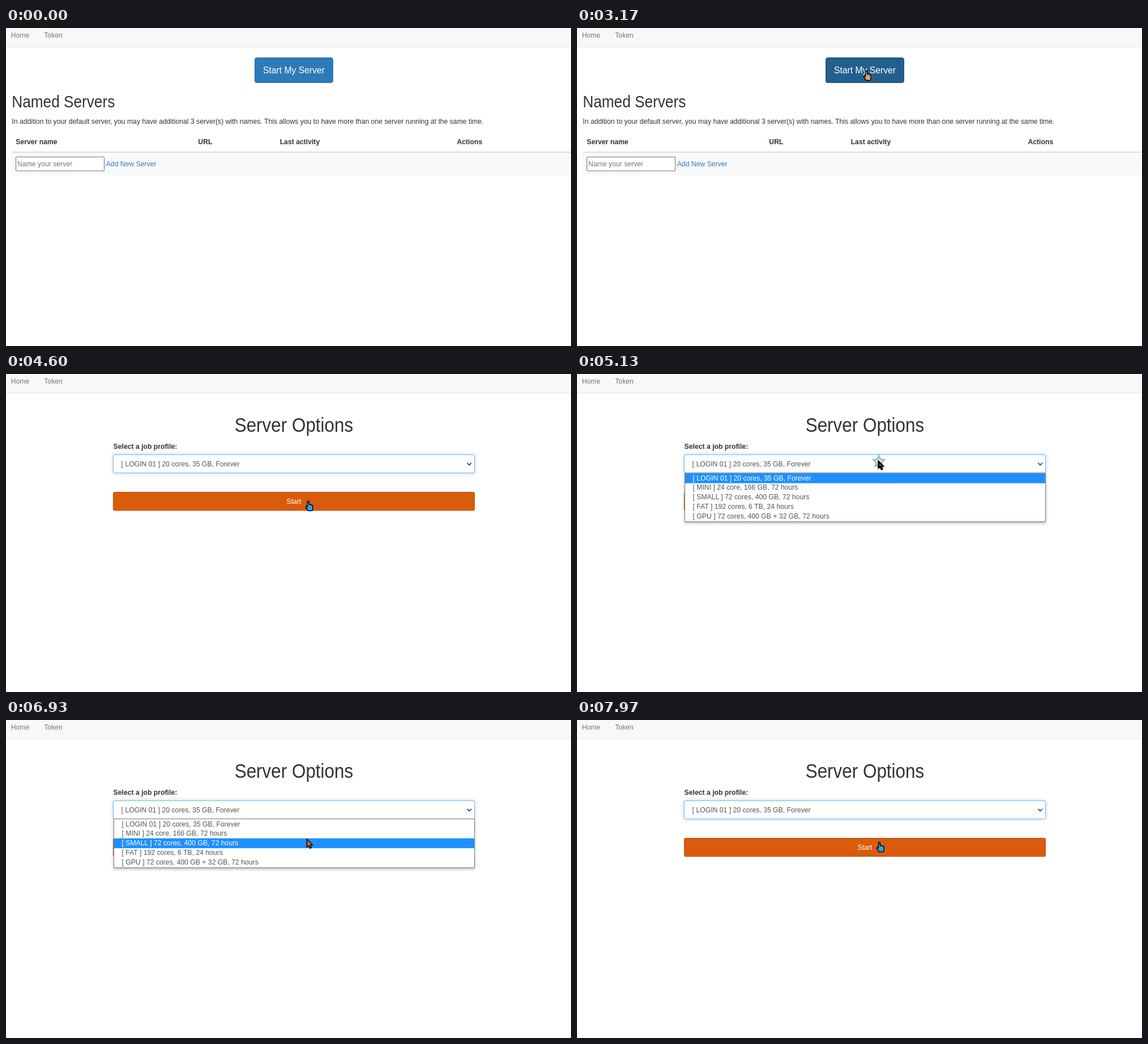
These frames come from a looping animation (998x561 px, 8 s). An HTML page:

```html
<!DOCTYPE html>
<html lang="en">
<head>
<meta charset="utf-8">
<title>Server start</title>
<style>
  html, body { margin: 0; width: 100%; height: 100%; overflow: hidden; background: #fff; }
  svg { display: block; width: 998px; height: 561px; }
  text { font: 14px "Liberation Sans", Arial, sans-serif; fill: #333; }
  .nav text { fill: #777; }
  .th text, .bold { font-weight: bold; }
  .mid { text-anchor: middle; }
  .white { fill: #fff; }
  .gray { fill: #757575; }
  .link { fill: #337ab7; }
  .field, .row text { fill: #555; }
  .h1 { font-size: 36px; }
  .h2 { font-size: 30px; }
  .big { font-size: 18px; }

  #launch { fill: #2d7ab8; stroke: #2c70a9; }
  #launch.hover { fill: #225f8e; stroke: #204d74; }
  #start { fill: #f37524; stroke: #e2611a; }
  #start.hover { fill: #d95c0c; stroke: #b84c08; }
  #glow { fill: #fff; stroke: #7dbbec; filter: drop-shadow(0 0 3px rgba(102, 175, 233, .6)); }
  #menu > rect { fill: #fff; stroke: #808080; filter: drop-shadow(0 2px 2.5px rgba(0, 0, 0, .3)); }
  .row rect { fill: none; }
  .row.hover rect { fill: #1e90ff; }
  .row.hover text { fill: #fff; }

  #star { fill: none; stroke: #77a5a3; stroke-width: 3; }
  #invert { fill: #fff; mix-blend-mode: difference; }
  #outline { fill: none; stroke: #000; stroke-width: 1.5; stroke-linejoin: round; }
</style>
</head>
<body>
<svg viewBox="0 0 998 561">
  <rect width="998" height="561" fill="#fff"/>
  <rect width="998" height="33" fill="#f8f8f8"/>
  <rect y="33" width="998" height="1" fill="#e7e7e7"/>
  <g class="nav" transform="scale(.8735 .96)">
    <text x="10" y="17.7">Home</text>
    <text x="77" y="17.7">Token</text>
  </g>

  <g id="home">
    <rect id="launch" x="439.5" y="52.5" width="138" height="44" rx="3.5"/>
    <rect x="10" y="218" width="988" height="2" fill="#ddd"/>
    <rect x="10" y="220" width="988" height="40" fill="#f9f9f9"/>
    <rect x="17.5" y="227.5" width="156" height="24.5" rx="1.5" fill="#fff" stroke="#767676" stroke-width="1.1"/>
    <g transform="scale(.8735 .96)">
      <text class="big mid white" x="582.1" y="83.3">Start My Server</text>
      <text class="h2" x="11.8" y="145.7">Named Servers</text>
      <text x="11.8" y="176.4">In addition to your default server, you may have additional 3 server(s) with names. This allows you to have more than one server running at the same time.</text>
      <g class="th">
        <text x="19.8" y="213.7">Server name</text>
        <text x="388.5" y="213.7">URL</text>
        <text x="553.7" y="213.7">Last activity</text>
        <text x="911.8" y="213.7">Actions</text>
      </g>
      <text class="gray" x="23" y="254.2">Name your server</text>
      <text class="link" x="202.3" y="254.2">Add New Server</text>
    </g>
  </g>

  <g id="options">
    <rect x="189.5" y="142.5" width="638" height="32" rx="2" fill="#fff" stroke="#a5cff0"/>
    <rect id="glow" x="189.5" y="142.5" width="638" height="32" rx="2"/>
    <path d="M814.5 156.7l3.8 3.8 3.8-3.8" fill="none" stroke="#333" stroke-width="1.6"/>
    <rect id="start" x="189.5" y="208.5" width="638" height="32.3" rx="2"/>
    <g transform="scale(.8735 .96)">
      <text class="h1 mid" x="582.1" y="106.2">Server Options</text>
      <text class="bold" x="217.1" y="137.6">Select a job profile:</text>
      <text class="field" x="233.1" y="169.5">[ LOGIN 01 ] 20 cores, 35 GB, Forever</text>
      <text class="mid white" x="582.1" y="238.8">Start</text>
    </g>
    <g id="menu"><rect x="190.5" y="174.5" width="637" height="86"/></g>
  </g>

  <path id="star"/>
  <path id="invert"/>
  <path id="outline"/>
</svg>
<script>
const LOOP = 8000;
const PAGE_AT = 3970, FOCUS_AT = 4270, OPEN_AT = 4870, CLOSE_AT = 7130;
const CLICKS = [3200, OPEN_AT, CLOSE_AT], CLICK_MS = 400;
const ROW_TOP = 175.2, ROW_H = 16.75;

const SHAPES = {
  arrow: 'M0 0V14.3L3.3 11.4L5.5 16.4L8 15.3L5.9 10.5H10Z',
  hand: 'M-1.5 9.5V1.5Q-1.5 0 0 0T1.5 1.5V6Q3 5.4 4 6.5Q5.5 6 6.3 7.2Q8.2 7 8.2 9V12Q8.2 14.5 7 17H-.5Q-1.5 14.5-4 11.5Q-4.6 9.8-3.5 9Q-2.5 8.8-1.5 10.5Z',
  beam: 'M-4-6H4M0-6V6M-4 6H4'
};

// pointer tip: time, x, y
const PATH = [
  [830, 497, 530], [1370, 520, 106], [1600, 520, 106], [1630, 520, 104.5],
  [1690, 520, 104.5], [1700, 523, 99], [1900, 523, 99], [2120, 562, 131],
  [2330, 597, 104], [2670, 511, 68], [2715, 511, 68], [2730, 511, 75.5],
  [3200, 511, 75.5], [3600, 650, 99], [3969, 650, 99], [3970, 529, 175],
  [4260, 529, 175], [4330, 534, 232], [4570, 534, 232], [4730, 532, 152.5],
  [5300, 532, 152.5], [5630, 532, 186], [5700, 532, 186], [6500, 533, 249],
  [6730, 533, 249], [6930, 531.5, 210], [7130, 532, 191], [7560, 532, 191],
  [7720, 533, 172], [7960, 534, 215.5], [8000, 534, 215.5]
];

const PROFILES = [
  '[ LOGIN 01 ] 20 cores, 35 GB, Forever',
  '[ MINI ] 24 core, 166 GB, 72 hours',
  '[ SMALL ] 72 cores, 400 GB, 72 hours',
  '[ FAT ] 192 cores, 6 TB, 24 hours',
  '[ GPU ] 72 cores, 400 GB + 32 GB, 72 hours'
];

const el = id => document.getElementById(id);
const [home, options, launch, start, glow, menu, star, invert, outline] =
  ['home', 'options', 'launch', 'start', 'glow', 'menu', 'star', 'invert', 'outline'].map(el);
const show = (node, on) => { node.style.display = on ? '' : 'none'; };
const hover = (node, on) => node.classList.toggle('hover', on);

function add(parent, tag, attrs) {
  const node = document.createElementNS('http://www.w3.org/2000/svg', tag);
  for (const key in attrs) node.setAttribute(key, attrs[key]);
  return parent.appendChild(node);
}

const rows = PROFILES.map((label, i) => {
  const y = ROW_TOP + i * ROW_H;
  const row = add(menu, 'g', { class: 'row' });
  add(row, 'rect', { x: 191, y, width: 636, height: ROW_H + .7 });
  add(row, 'text', { transform: `translate(204.5 ${y + 12.3}) scale(.8735 .96)` }).textContent = label;
  return row;
});

const points = Array.from({ length: 10 }, (_, i) => {
  const a = i * Math.PI / 5 - Math.PI / 2, r = i % 2 ? .48 : 1;
  return [r * Math.cos(a), r * Math.sin(a)];
});
const starPath = (x, y, size) =>
  'M' + points.map(([px, py]) => `${x + px * size} ${y + py * size}`).join('L') + 'Z';

function pointerAt(t) {
  const i = Math.max(1, PATH.findIndex(key => key[0] > t));
  const [t0, x0, y0] = PATH[i - 1], [t1, x1, y1] = PATH[i];
  const p = Math.max(0, (t - t0) / (t1 - t0));
  const e = i === 1 ? 1 - (1 - p) ** 2 : p * p * (3 - 2 * p);
  return [x0 + (x1 - x0) * e, y0 + (y1 - y0) * e];
}

function draw(t) {
  const [x, y] = pointerAt(t);
  const second = t >= PAGE_AT;
  const open = t >= OPEN_AT && t < CLOSE_AT;
  const within = (left, top, right, bottom) => x > left && x < right && y > top && y < bottom;
  const onLaunch = !second && within(439, 52, 578, 97);
  const onStart = second && !open && within(189, 208, 828, 242);

  show(home, !second);
  show(options, second);
  show(menu, open);
  hover(launch, onLaunch);
  hover(start, onStart);
  glow.style.opacity = t < FOCUS_AT ? .45 : 1;
  const active = Math.max(0, Math.floor((y - ROW_TOP) / ROW_H));
  rows.forEach((row, i) => hover(row, i === active));

  const click = CLICKS.find(at => t >= at && t < at + CLICK_MS);
  show(star, click !== undefined);
  if (click !== undefined) {
    const p = (t - click) / CLICK_MS, [cx, cy] = pointerAt(click);
    star.setAttribute('d', starPath(cx + 1, cy + 2, 15 * p));
    star.style.opacity = 1 - .45 * p;
  }

  const beam = second && t < FOCUS_AT;
  const shape = SHAPES[beam ? 'beam' : onLaunch || onStart ? 'hand' : 'arrow'];
  for (const part of [invert, outline]) {
    show(part, t >= PATH[0][0]);
    part.setAttribute('d', shape);
    part.setAttribute('transform', `translate(${x} ${y})`);
  }
  outline.style.strokeWidth = beam ? 2.3 : 1.5;
}

const begin = performance.now();
function tick() {
  draw((performance.now() - begin) % LOOP);
  requestAnimationFrame(tick);
}
tick();
</script>
</body>
</html>
```
